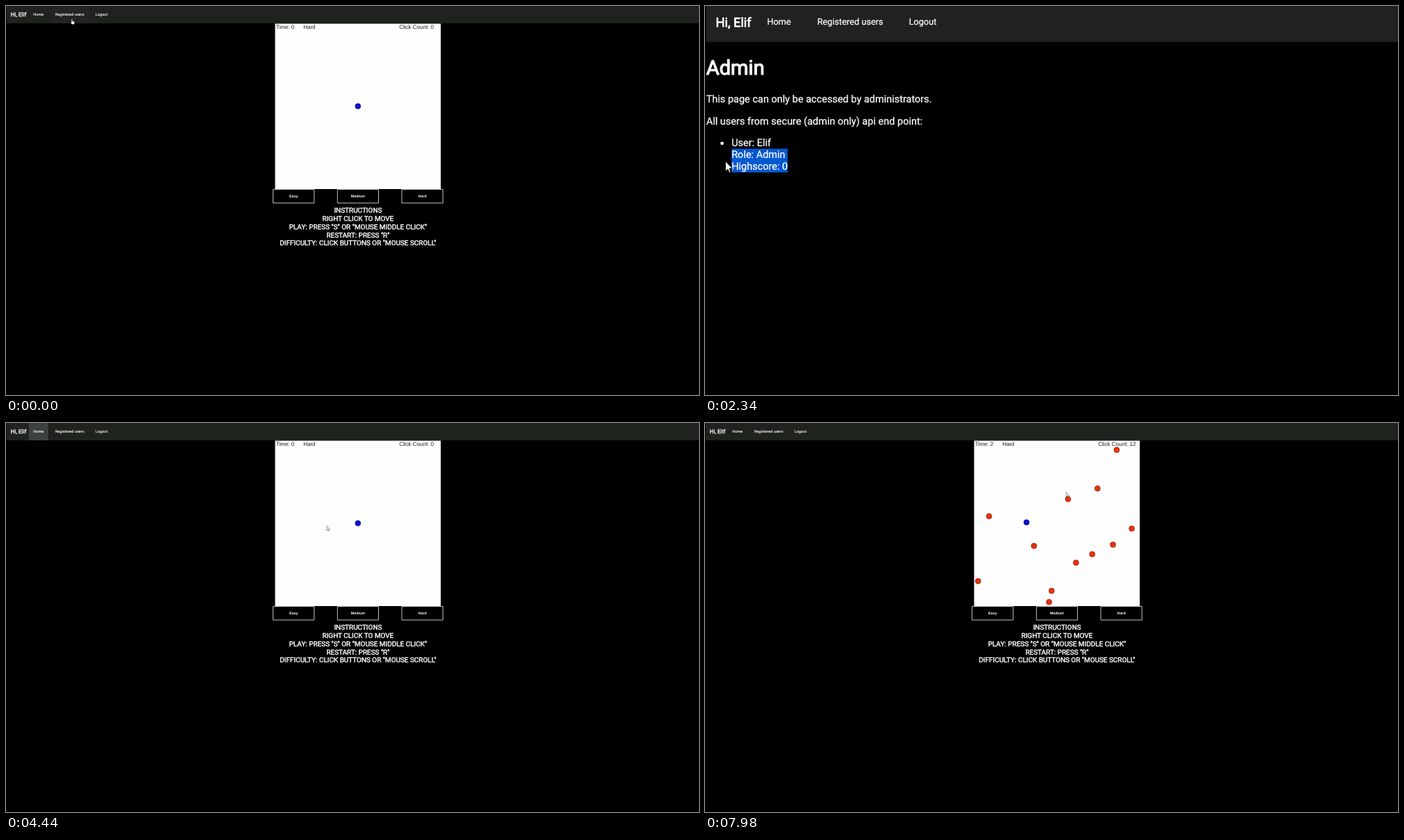
Recreate the animation shown at these times as an HTML page with a canvas. Size 998 px wide and 561 px high, loop 8 s.

```html
<!DOCTYPE html>
<html lang="en">
<head>
<meta charset="utf-8">
<title>Dodge game</title>
<style>
html, body { margin: 0; width: 100%; height: 100%; overflow: hidden; background: #000; }
canvas { display: block; }
</style>
</head>
<body>
<canvas id="stage" width="998" height="561"></canvas>
<script>
const ctx = document.getElementById('stage').getContext('2d');
const LOOP = 8000;
const USER = 'Elif';
const SANS = 'Roboto, sans-serif';
const ARIAL = '"Liberation Sans", Arial, sans-serif';
const LEFT = 0.75, INDENT = LEFT + 16, BAR_H = 24.95, MID = 506.9;
const BODY = 6.37, LINE = 7.5;
const ZOOM = 2.28, PIVOT_Y = 3.8;
const ADMIN_FROM = 330, ADMIN_TO = 3520, DRAG_END = 2550;
const GAME_START = 5100, SPAWN_GAP = 250;
const CLICK_START = 5500, CLICK_GAP = 205;
const ARENA = { x: 387.5, y: 25.5, w: 238.6, h: 238.5 };
const RADIUS = 4, SPEED = 0.054;

// Key points: time, x, y
const POINTER = [
  [0, 95, 18.7], [400, 95, 18.7], [1140, 60.8, 102.8], [2340, 12.9, 100.3],
  [DRAG_END, 14, 102], [3120, 30.8, 79.5], [3450, 47, 14], [4440, 462, 148.5],
  [6750, 479, 114], [7980, 520, 100]
];
const PLAYER = [[CLICK_START, 506.8, 144.6], [6750, 494.8, 141.9], [7980, 463, 143.3]];

const clamp = v => Math.min(1, Math.max(0, v));
const mix = (a, b, u) => a + (b - a) * u;
const linear = (t, from, to) => clamp((t - from) / (to - from));
const ease = (t, from, to) => (1 - Math.cos(Math.PI * linear(t, from, to))) / 2;
const ticks = (t, from, gap) => Math.max(0, Math.floor((t - from) / gap));

function along(keys, t, pace) {
  let i = 0;
  while (i < keys.length - 2 && t >= keys[i + 1][0]) i++;
  const [a, b] = [keys[i], keys[i + 1]];
  const u = pace(t, a[0], b[0]);
  return { x: mix(a[1], b[1], u), y: mix(a[2], b[2], u) };
}

function random(seed) {
  const v = Math.sin(seed * 127.1 + 11.7) * 43758.5453;
  return v - Math.floor(v);
}

function bounce(v, lo, size) {
  const min = lo + RADIUS, span = size - 2 * RADIUS;
  const r = (((v - min) % (2 * span)) + 2 * span) % (2 * span);
  return min + span - Math.abs(span - r);
}

function text(str, x, y, size, { color = '#fff', family = SANS, weight = 400, align = 'left', bolder = 0.018 } = {}) {
  ctx.font = `${weight} ${size}px ${family}`;
  ctx.textAlign = align;
  ctx.fillStyle = ctx.strokeStyle = color;
  ctx.fillText(str, x, y);
  if (bolder) {
    ctx.lineWidth = size * bolder;
    ctx.lineJoin = 'round';
    ctx.strokeText(str, x, y);
  }
}

function box(x, y, w, h, color) {
  ctx.fillStyle = color;
  ctx.fillRect(x, y, w, h);
}

function disc(x, y, r, color) {
  ctx.beginPath();
  ctx.arc(x, y, r, 0, 7);
  ctx.fillStyle = color;
  ctx.fill();
}

function ball(x, y, color) {
  disc(x, y, RADIUS, color);
  ctx.lineWidth = 0.45;
  ctx.strokeStyle = '#200';
  ctx.stroke();
}

function drawNav(t) {
  box(LEFT, 0, 998, BAR_H, '#20221f');
  const users = mix(0.1, 1, linear(t, 0, 200)) - linear(t, 450, 600);
  const home = linear(t, 3330, 3480) - linear(t, 4520, 4720);
  box(64.2, 0, 54.5, BAR_H, `rgba(62,66,68,${clamp(users)})`);
  box(32.8, 0, 28, BAR_H, `rgba(62,64,64,${home})`);
  text('Hi, ' + USER, 6.8, 15.1, 8, { bolder: 0.045 });
  text('Home', 39.2, 14, 5.6);
  text('Registered users', 70.9, 14, 5.6);
  text('Logout', 128.8, 14, 5.6);
}

function drawSelection(t, p) {
  if (t < 1140) return;
  const right = 52.2, top = 99.9;
  const start = t < DRAG_END ? Math.max(INDENT, Math.min(right, p.x)) : INDENT;
  const rows = t < DRAG_END && p.x < INDENT && p.y < 101 ? 2 : 1;
  box(start, top - (rows - 1) * LINE, right - start, rows * LINE, '#0458d0');
}

function drawAdmin(t, p) {
  text('Admin', LEFT, 45.4, 12.75, { bolder: 0.04 });
  text('This page can only be accessed by administrators.', LEFT, 63.05, BODY);
  text('All users from secure (admin only) api end point:', LEFT, 77, BODY);
  drawSelection(t, p);
  disc(10.8, 89, 1.05, '#fff');
  ['User: ' + USER, 'Role: Admin', 'Highscore: 0'].forEach((line, i) =>
    text(line, INDENT, 90.85 + i * LINE, BODY));
}

function drawButton(label, x) {
  ctx.lineWidth = 0.9;
  ctx.strokeStyle = '#d8d8d8';
  ctx.strokeRect(x - 29.6, 264.5, 59.2, 19.6);
  text(label, x, 276.2, 5.33, { family: ARIAL, weight: 700, align: 'center', bolder: 0 });
}

function drawEnemy(i, age) {
  if (age < 0) return;
  const heading = 2 * Math.PI * random(i + 40);
  const x = ARENA.x + ARENA.w * random(i) + Math.cos(heading) * SPEED * age;
  const y = ARENA.y + ARENA.h * random(i + 20) + Math.sin(heading) * SPEED * age;
  ball(bounce(x, ARENA.x, ARENA.w), bounce(y, ARENA.y, ARENA.h), '#f03008');
}

function drawGame(t) {
  box(ARENA.x, ARENA.y, ARENA.w, ARENA.h, '#fefefe');

  const me = along(PLAYER, t, linear);
  ball(me.x, me.y, '#0012e0');
  for (let i = 0; i < 12; i++) drawEnemy(i, t - GAME_START - i * SPAWN_GAP);

  const ink = { color: '#1c1c1c', family: ARIAL, bolder: 0 };
  text('Time: ' + ticks(t, GAME_START, 1000), 388.9, 33.4, 8, ink);
  text('Hard', 428.2, 33.4, 8, ink);
  text('Click Count: ' + ticks(t, CLICK_START, CLICK_GAP), 566.2, 33.4, 8, ink);

  ['Easy', 'Medium', 'Hard'].forEach((label, i) => drawButton(label, MID + (i - 1) * 92.7));
  [
    'INSTRUCTIONS',
    'RIGHT CLICK TO MOVE',
    'PLAY: PRESS "S" OR "MOUSE MIDDLE CLICK"',
    'RESTART: PRESS "R"',
    'DIFFICULTY: CLICK BUTTONS OR "MOUSE SCROLL"'
  ].forEach((line, i) =>
    text(line, MID, 297.8 + i * 11.92, 9.95, { align: 'center', bolder: 0.04 }));
}

const ARROW = new Path2D('M0 0V16.5L3.8 13L6.3 18.8L8.7 17.7L6.3 12.1H11.6Z');
const HAND = new Path2D('M-2 1Q0-1 2 1V8L8 9.5Q10 10 9.8 13L8.5 20H-.5L-5 13.5Q-5.5 11-2 13Z');

function drawPointer(p) {
  const onLink = p.y < BAR_H && p.x > 32 && p.x < 152;
  const shape = onLink ? HAND : ARROW;
  ctx.save();
  ctx.translate(p.x, p.y);
  ctx.scale(0.39, 0.39);
  ctx.fillStyle = '#fff';
  ctx.strokeStyle = '#000';
  ctx.lineWidth = 1.1;
  ctx.fill(shape);
  ctx.stroke(shape);
  ctx.restore();
}

function draw(t) {
  const s = 1 + (ZOOM - 1) * (ease(t, 172, 1522) - ease(t, 2553, 3903));
  ctx.setTransform(1, 0, 0, 1, 0, 0);
  box(0, 0, 998, 561, '#000');
  ctx.setTransform(s, 0, 0, s, 0, -(s - 1) * PIVOT_Y);
  ctx.textRendering = 'geometricPrecision';

  const p = along(POINTER, t, ease);
  drawNav(t);
  if (t >= ADMIN_FROM && t < ADMIN_TO) drawAdmin(t, p);
  else drawGame(t);
  drawPointer(p);
}

const begin = performance.now();
function tick() {
  draw((performance.now() - begin) % LOOP);
  requestAnimationFrame(tick);
}
tick();
</script>
</body>
</html>
```
